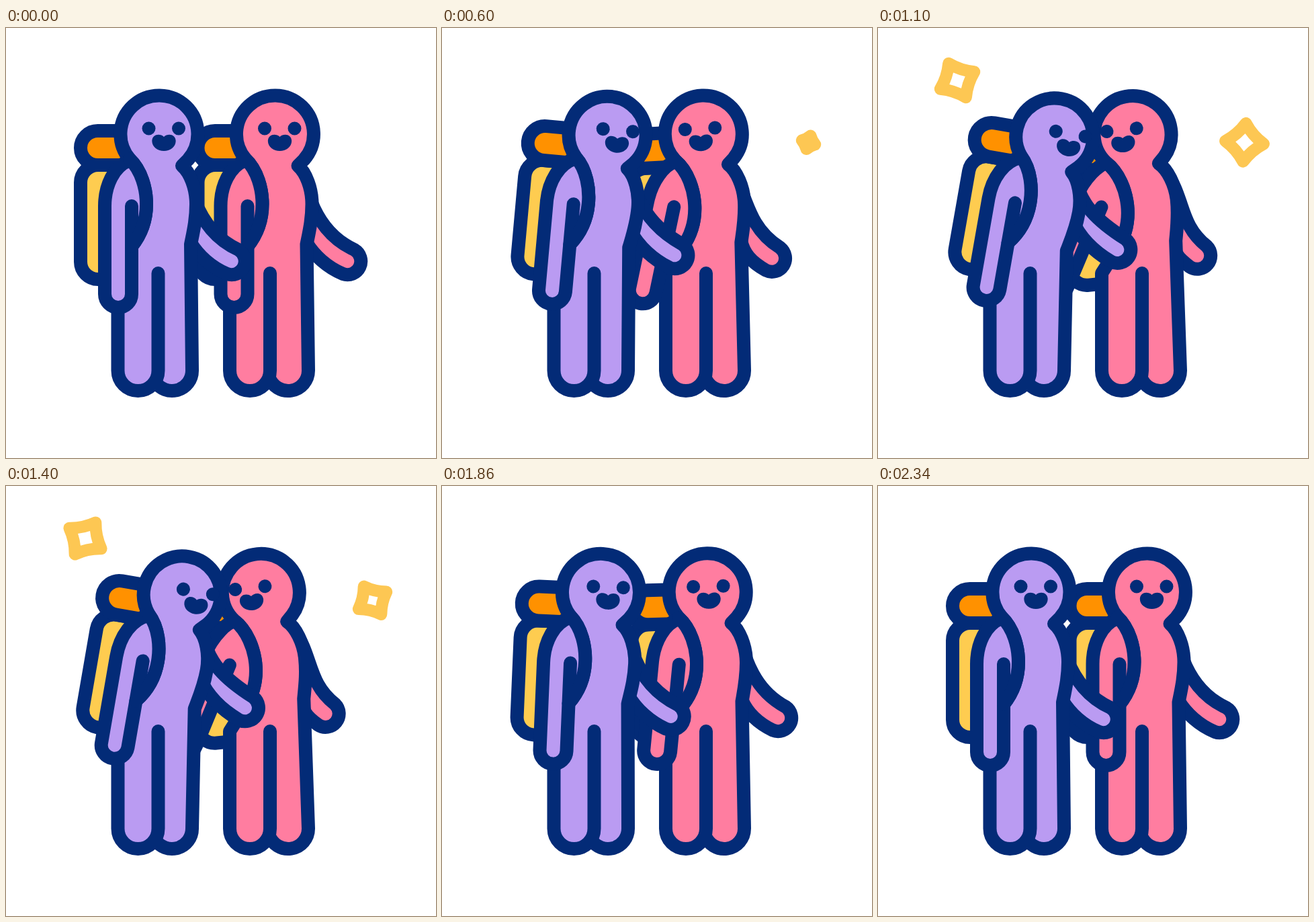
Write an HTML page that moves like this. It is 640 by 640 pixels and loops after 2400 ms.

```html
<!DOCTYPE html>
<html lang="en">
<head>
<meta charset="utf-8">
<title>Two hikers</title>
<style>
html, body { margin: 0; width: 100%; height: 100%; overflow: hidden; background: #fff; }
svg { display: block; width: 100%; height: 100%; }
</style>
</head>
<body>
<svg id="stage" viewBox="0 0 640 640"></svg>
<script>
const LOOP = 2400;
const NAVY = '#032b77', YELLOW = '#fecc50', ORANGE = '#ff9100', SPARK = '#fdc753';
const stage = document.getElementById('stage');

function add(parent, tag, attrs) {
  const el = document.createElementNS('http://www.w3.org/2000/svg', tag);
  for (const k in attrs) el.setAttribute(k, attrs[k]);
  parent.appendChild(el);
  return el;
}

function rot(x, y, cx, cy, deg) {
  const a = deg * Math.PI / 180, c = Math.cos(a), s = Math.sin(a);
  return [cx + (x - cx) * c - (y - cy) * s, cy + (x - cx) * s + (y - cy) * c];
}

const fmt = p => p[0].toFixed(2) + ' ' + p[1].toFixed(2) + ' ';

// Symmetric cubic-bezier(c, 0, 1 - c, 1)
function ease(x, c) {
  x = Math.min(1, Math.max(0, x));
  let lo = 0, hi = 1;
  for (let i = 0; i < 24; i++) {
    const s = (lo + hi) / 2, r = 1 - s;
    if (3 * c * s * r * r + 3 * (1 - c) * s * s * r + s * s * s < x) lo = s; else hi = s;
  }
  return lo * lo * (3 - 2 * lo);
}

const HIP = [222, 360], SHOULDER = [187.5, 230], HAND = [337.5, 348];

function hiker(o) {
  const root = add(stage, 'g', { stroke: NAVY, 'stroke-width': 20, 'stroke-linejoin': 'round', 'stroke-linecap': 'round' });
  const pack = add(root, 'g', {});
  const px = 111 + o.dx + o.packDx;
  add(pack, 'rect', { x: px, y: 204, width: 90, height: 170, rx: 26, fill: YELLOW });
  add(pack, 'rect', { x: px, y: 153, width: 95, height: 51, rx: 25.5, fill: ORANGE });
  const farArm = add(root, 'path', { fill: o.color });
  const body = add(root, 'path', { fill: o.color });
  const armFill = add(root, 'path', { fill: o.color, stroke: 'none' });
  const armLine = add(root, 'path', { fill: 'none' });
  const chest = add(root, 'path', { fill: 'none' });
  const face = add(root, 'g', { fill: NAVY, stroke: 'none' });
  add(face, 'circle', { cx: 212.5, cy: 149.5, r: 10 });
  add(face, 'circle', { cx: 257, cy: 149.5, r: 10 });
  add(face, 'path', { d: 'M235 162C230 157 218 157 217.3 168C217.3 177 226 183 235 183C244 183 252.7 177 252.7 168C252 157 240 157 235 162Z' });

  const midX = (o.left + o.right) / 2;
  const midY = 510 + Math.sqrt(900 - (midX - o.left) ** 2);

  return p => {
    const lean = o.lean * p;
    const B = (x, y) => fmt(rot(x + o.dx, y, HIP[0] + o.dx, HIP[1], lean));
    const A = (x, y) => B(...rot(x, y, ...SHOULDER, o.swing * p));
    const H = (x, y) => {
      const q = rot(x, y, ...HAND, o.handTurn * p);
      return fmt([q[0] + o.dx + o.hand[0] * p, q[1] + o.hand[1] * p]);
    };
    const turn = `rotate(${lean} ${HIP[0] + o.dx} ${HIP[1]})`;
    pack.setAttribute('transform', turn);
    face.setAttribute('transform', `${turn} translate(${o.dx + o.face * p} 0)`);

    farArm.setAttribute('d',
      'M' + B(262, 205) + 'L' + B(270, 215) +
      'C' + B(278 + o.bend[0] * p, 262 + o.bend[1] * p) + H(298, 308) + H(346, 330) +
      'A20 20 0 0 1 ' + H(329, 366) +
      'C' + H(305, 356) + B(286 + o.under[0] * p, 338 + o.under[1] * p) + B(275, 320 - o.lift * p));

    body.setAttribute('d',
      `M${o.crotch} 365V510A30 30 0 0 1 ${o.left - 30} 510V365` +
      'L' + B(187, 325) +
      'C' + B(203, 305) + B(209, 285) + B(209, 262) +
      'C' + B(209, 240) + B(202, 212) + B(184, 195) +
      'A57.5 57.5 0 1 1 ' + B(271, 196) +
      'L' + B(262, 205) +
      'C' + B(274, 215) + B(283, 239) + B(283, 262) +
      'C' + B(283, 285) + B(279, 302) + B(275, 322) +
      `L${o.right + 30} 510A30 30 0 0 1 ${midX} ${midY}`);

    const side = 'C' + B(202, 212) + B(209, 240) + B(209, 262) +
      'C' + B(209, 285) + B(203, 305) + B(187, 325);
    const arm = 'M' + A(187, 265) + 'L' + A(187, 396) +
      'A20 20 0 0 1 ' + A(147, 396) + 'L' + A(147, 265) +
      'C' + A(147, 235) + A(160, 206) + B(184, 197);
    armFill.setAttribute('d', arm + side + 'L' + A(187, 315) + 'Z');
    armLine.setAttribute('d', arm);
    chest.setAttribute('d', 'M' + B(184, 195) + side);
  };
}

// Four-pointed star with hollow sides and a constant thick outline
function sparkle(cx, cy, mid) {
  const el = add(stage, 'path', { fill: 'none', stroke: SPARK, 'stroke-linejoin': 'round' });
  const half = 540, tip = 28.5, dent = 11;
  return t => {
    const d = (t - mid) / half;
    const s = 1 - Math.abs(d) ** 3.7;
    el.setAttribute('visibility', s > 0 ? 'visible' : 'hidden');
    if (s <= 0) return;
    const u = (d + 1) / 2;
    const turn = (u * u * (3 - 2 * u) * 2 - 1) * 74;
    const R = tip * s, c = dent * s;
    el.setAttribute('d', `M${R} 0Q${c} ${c} 0 ${R}Q${-c} ${c} ${-R} 0Q${-c} ${-c} 0 ${-R}Q${c} ${-c} ${R} 0Z`);
    el.setAttribute('transform', `translate(${cx} ${cy}) rotate(${turn})`);
    el.setAttribute('stroke-width', 18 * Math.min(1, s * 4));
  };
}

const hikers = [
  hiker({ color: '#ff7da0', dx: 172.5, packDx: 2, lean: -6.1, left: 363, right: 420, crotch: 393,
    face: -22.5, swing: 29, hand: [-33.5, -8], handTurn: 14, bend: [18, 0], under: [-16, 0], lift: 0 }),
  hiker({ color: '#ba9bf2', dx: 0, packDx: 0, lean: 10, left: 196.5, right: 247, crotch: 226.5,
    face: 16, swing: 0, hand: [20.5, -17], handTurn: 8, bend: [6, -12], under: [7, -36], lift: 45 })
];
const sparkles = [sparkle(545.5, 170.3, 1080), sparkle(118, 78, 1235)];

function draw(t) {
  const p = t < 1195 ? ease(t / 1190, 0.7) : 1 - ease((t - 1200) / 1160, 0.8);
  hikers.forEach(f => f(p));
  sparkles.forEach(f => f(t));
}

const start = performance.now();
function tick() {
  draw((performance.now() - start) % LOOP);
  requestAnimationFrame(tick);
}
draw(0);
requestAnimationFrame(tick);
</script>
</body>
</html>
```
